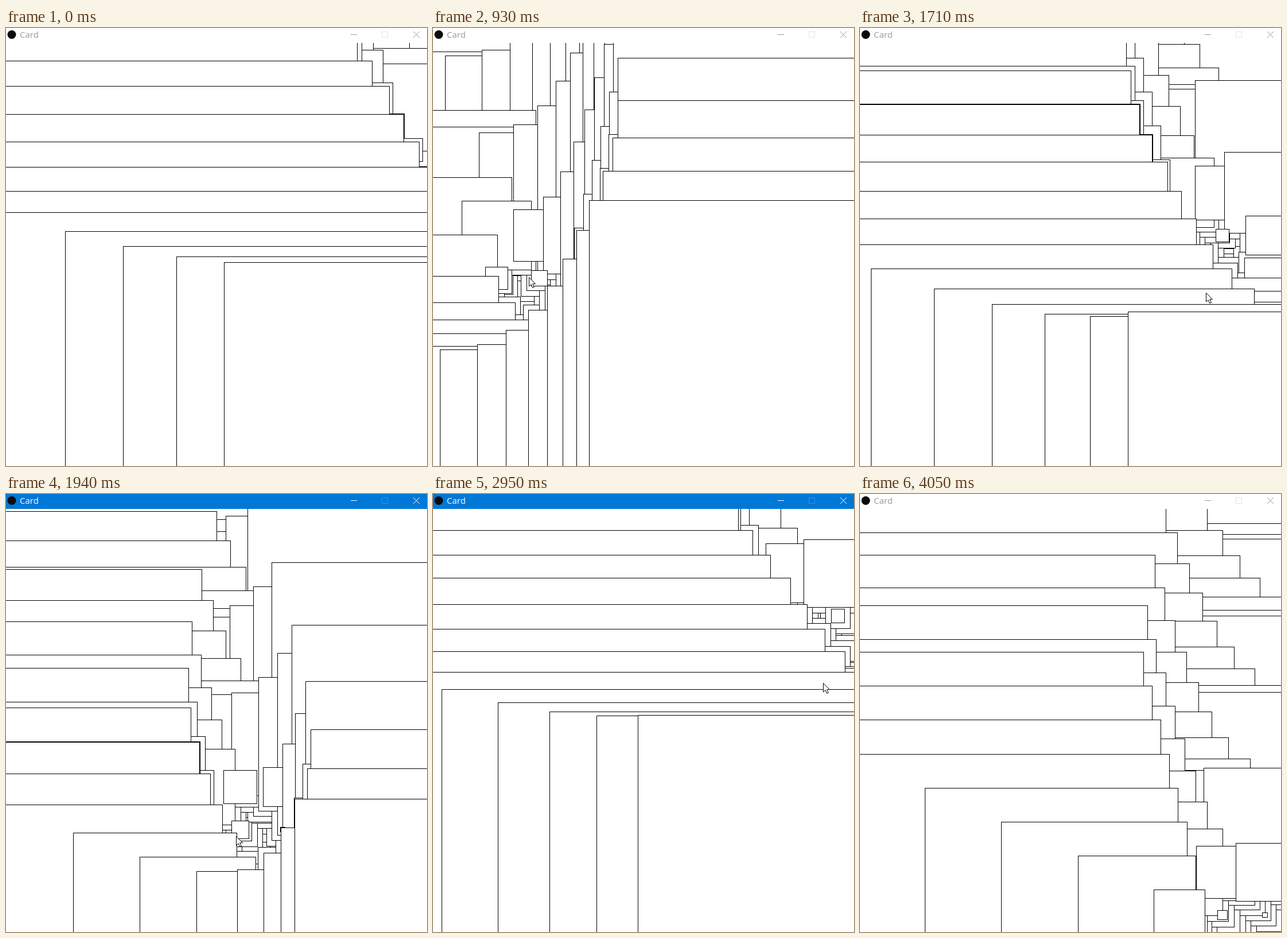
Write an HTML page with a canvas that moves like this. It is 734 by 763 pixels and loops after 4140 ms.

```html
<!DOCTYPE html>
<html>
<head>
<meta charset="utf-8">
<title>Card</title>
<style>
html, body { margin: 0; width: 100%; height: 100%; overflow: hidden; background: #fff; }
canvas { display: block; }
</style>
</head>
<body>
<canvas id="stage" width="734" height="763"></canvas>
<script>
const ctx = document.getElementById('stage').getContext('2d');
const WIDTH = 734, HEIGHT = 763, BAR = 26, LOOP = 4140;
const FOCUS_START = 1790, FOCUS_END = 4050;
const STEP = 76, LAST_STEP = 48, ARROW_LEAD = 0.6;
const CELLS = 10, PITCH = 74.4, LEFT = 36, TOP = 63.4;
const LAYERS = 5, LAYER_STEP = 9.6, GROWTH = 0.8, SHRINK = 40;
const ARROW = new Path2D('M0 0V15.5L3.6 12.2L6.2 18L8.8 16.8L6.3 11.2H11Z');

// The pointer sweeps clockwise around a centre through a few places
const CENTRE = { x: 400, y: 380 };
const keys = [];
function passThrough(step, x, y) {
  const dx = x - CENTRE.x, dy = y - CENTRE.y;
  let angle = Math.atan2(dy, dx);
  const previous = keys.length ? keys[keys.length - 1].angle : angle;
  while (angle < previous - 0.5) angle += Math.PI * 2;
  keys.push({ step, angle, radius: Math.hypot(dx, dy) });
}
passThrough(0, 742, 278);
passThrough(7, 408, 626.3);
passThrough(18, 338.5, 155.4);
passThrough(25, 438, 591);
passThrough(32, 117.3, 420);
passThrough(43, 546, 623.5);
passThrough(LAST_STEP, 658.4, 761.5);

function rate(i, name) {
  const a = keys[i], b = keys[i + 1];
  return a && b ? (b[name] - a[name]) / (b.step - a.step) : 0;
}

// Harmonic mean of the neighbouring rates: smooth, without overshoot
function slope(i, name) {
  const before = rate(i - 1, name), after = rate(i, name);
  return before * after > 0 ? 2 * before * after / (before + after) : 0;
}

function ease(step, i, name) {
  const a = keys[i], b = keys[i + 1], span = b.step - a.step;
  const u = (step - a.step) / span, v = 1 - u;
  return v * v * (1 + 2 * u) * a[name] + u * u * (3 - 2 * u) * b[name] +
    span * u * v * (v * slope(i, name) - u * slope(i + 1, name));
}

function pointerAt(step) {
  const s = Math.min(step, LAST_STEP);
  let i = 0;
  while (i < keys.length - 2 && keys[i + 1].step <= s) i++;
  const angle = ease(s, i, 'angle'), radius = ease(s, i, 'radius');
  return {
    x: CENTRE.x + radius * Math.cos(angle),
    y: CENTRE.y + radius * Math.sin(angle)
  };
}

function drawSquare(cx, cy, half) {
  const x = Math.round(cx - half), y = Math.round(cy - half);
  const w = Math.round(cx + half) - x, h = Math.round(cy + half) - y;
  ctx.fillRect(x + 0.5, y + 0.5, w, h);
  ctx.strokeRect(x + 0.5, y + 0.5, w, h);
}

function drawGrid(pointer) {
  ctx.strokeStyle = '#000';
  ctx.fillStyle = '#fff';
  for (let layer = LAYERS - 1; layer >= 0; layer--) {
    for (let row = 0; row < CELLS; row++) {
      for (let col = 0; col < CELLS; col++) {
        const cx = LEFT + PITCH * col, cy = TOP + PITCH * row;
        const distance = Math.hypot(cx - pointer.x, cy - pointer.y);
        drawSquare(cx, cy, Math.abs(GROWTH * distance - SHRINK + LAYER_STEP * layer));
      }
    }
  }
}

function drawArrow({ x, y }) {
  ctx.save();
  ctx.translate(Math.round(x) + 0.5, Math.round(y) + 0.5);
  ctx.fill(ARROW);
  ctx.stroke(ARROW);
  ctx.restore();
}

function drawBar(focused) {
  ctx.fillStyle = focused ? '#0078d7' : '#fff';
  ctx.fillRect(0, 0, WIDTH, BAR);
  ctx.fillStyle = '#0b0b0b';
  ctx.beginPath();
  ctx.arc(10, 11.5, 7.5, 0, Math.PI * 2);
  ctx.fill();

  const ink = focused ? '#fff' : '#999';
  ctx.fillStyle = ink;
  ctx.font = '15px "Open Sans", "Noto Sans", sans-serif';
  ctx.fillText('Card', 24, 17);
  ctx.fillRect(601, 11, 11, 1);
  ctx.strokeStyle = focused ? '#3393df' : '#e4e4e4';
  ctx.strokeRect(655.5, 6.5, 10, 10);
  ctx.strokeStyle = ink;
  ctx.beginPath();
  ctx.moveTo(710, 6);
  ctx.lineTo(721, 17);
  ctx.moveTo(721, 6);
  ctx.lineTo(710, 17);
  ctx.stroke();
}

function draw(t) {
  const step = Math.min(LAST_STEP, Math.floor((t + 6) / STEP));
  ctx.fillStyle = '#fff';
  ctx.fillRect(0, 0, WIDTH, HEIGHT);
  drawGrid(pointerAt(step));
  if (step < LAST_STEP) drawArrow(pointerAt(step + ARROW_LEAD));
  drawBar(t >= FOCUS_START && t < FOCUS_END);
}

const start = performance.now();
function tick() {
  draw((performance.now() - start) % LOOP);
  requestAnimationFrame(tick);
}
tick();
</script>
</body>
</html>
```
